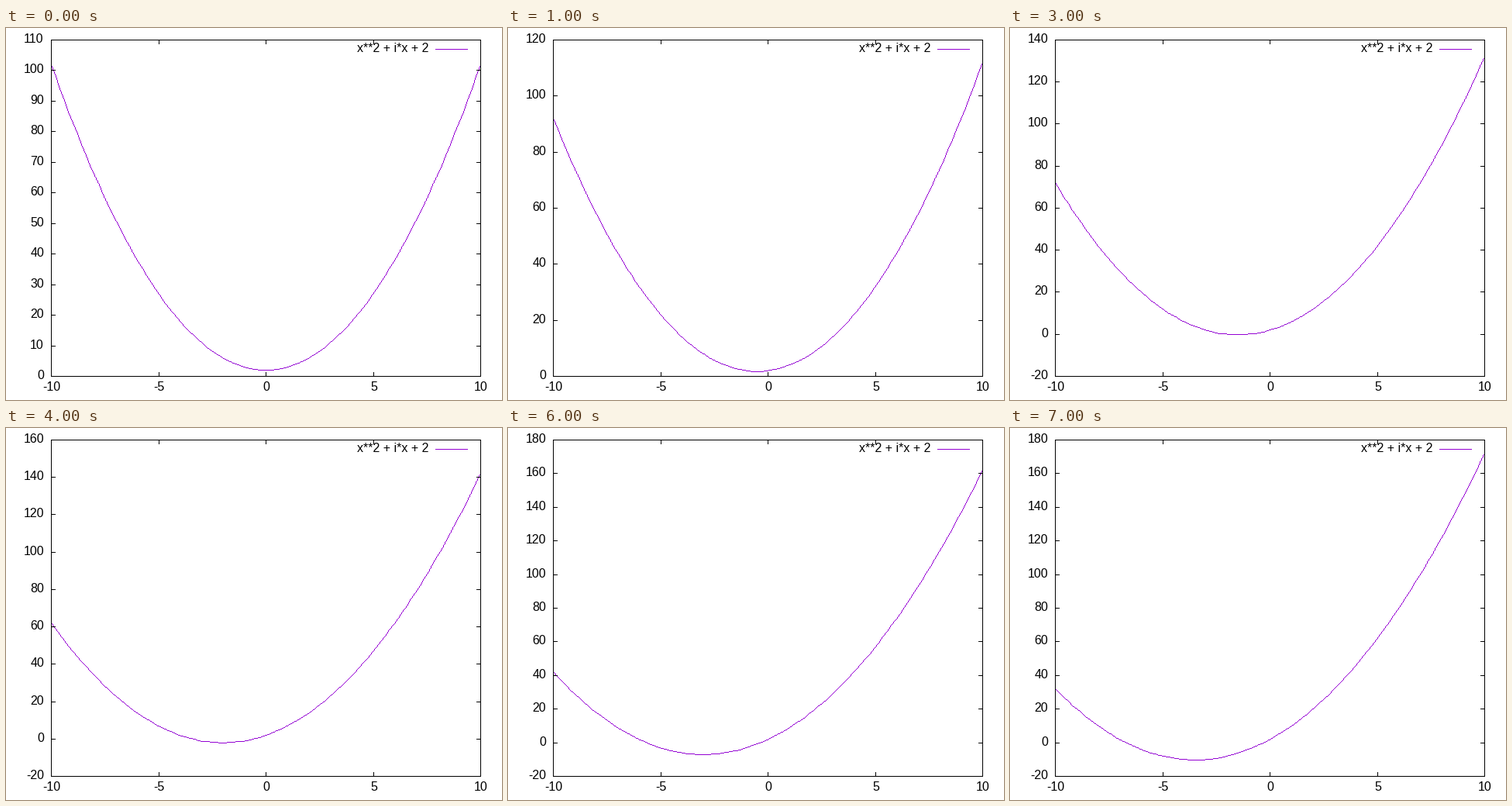
Write a matplotlib script that moves like this. It is 640 px wide and 480 px high and loops after 8000 ms.

```python
import numpy as np
import matplotlib.pyplot as plt
from matplotlib.animation import FuncAnimation

W, H, DPI = 640, 480, 100
LEFT, RIGHT, TOP, BOTTOM = 58, 612, 15, 449
TICK = 5
FONT_PX = 16
BLACK, PURPLE = (0, 0, 0), (148, 0, 211)

fig = plt.figure(figsize=(W / DPI, H / DPI), dpi=DPI, facecolor="white")
ax = fig.add_axes([0, 0, 1, 1])
ax.axis("off")
blank = np.full((H, W, 3), 255, np.uint8)
image = ax.imshow(blank, extent=(0, W, H, 0), aspect="auto",
                  interpolation="nearest")
ax.set_xlim(0, W)
ax.set_ylim(H, 0)


def advance(text):
    """Width in pixels of a number label."""
    return FONT_PX * sum(0.333 if c == "-" else 0.556 for c in text)


def label(x, baseline, text=""):
    return ax.text(x, baseline, text, family="Liberation Sans",
                   fontsize=FONT_PX * 72 / DPI, color="black",
                   ha="left", va="baseline")


def line(canvas, x0, y0, x1, y1, color):
    """One pixel wide line without antialiasing."""
    n = int(max(abs(x1 - x0), abs(y1 - y0))) + 1
    xs = np.rint(np.linspace(x0, x1, n)).astype(int)
    ys = np.rint(np.linspace(y0, y1, n)).astype(int)
    canvas[ys, xs] = color


def col(x):
    return np.floor(LEFT + (x + 10) * (RIGHT - LEFT) / 20 + 0.5).astype(int)


def row(y, lo, hi):
    up = np.floor((y - lo) * (BOTTOM - TOP) / (hi - lo) + 0.5)
    return BOTTOM - up.astype(int)


x_ticks = np.arange(-10, 11, 5)
for v in x_ticks:
    label(col(v) + 0.5 - advance(str(v)) / 2, 468, str(v))
label(453, 31, "x**2 + i*x + 2")
y_labels = [label(0, 0) for _ in range(12)]

samples = np.linspace(-10, 10, 100)


def draw(i):
    values = samples**2 + i * samples + 2
    step = 10 if i == 0 else 20
    lo = int(np.floor(values.min() / step)) * step
    hi = int(np.ceil(values.max() / step)) * step
    y_ticks = np.arange(lo, hi + 1, step)
    canvas = blank.copy()

    xs, ys = col(samples), row(values, lo, hi)
    for seg in zip(xs, ys, xs[1:], ys[1:]):
        line(canvas, *seg, PURPLE)
    line(canvas, 554, 27, 595, 27, PURPLE)

    for x in (LEFT, RIGHT):
        line(canvas, x, TOP, x, BOTTOM, BLACK)
    for y in (TOP, BOTTOM):
        line(canvas, LEFT, y, RIGHT, y, BLACK)
    for x in col(x_ticks):
        line(canvas, x, TOP, x, TOP + TICK, BLACK)
        line(canvas, x, BOTTOM - TICK, x, BOTTOM, BLACK)
    for y in row(y_ticks, lo, hi):
        line(canvas, LEFT, y, LEFT + TICK, y, BLACK)
        line(canvas, RIGHT - TICK, y, RIGHT, y, BLACK)
    image.set_data(canvas)

    for k, text in enumerate(y_labels):
        shown = k < len(y_ticks)
        text.set_visible(shown)
        if shown:
            name = str(y_ticks[k])
            text.set_text(name)
            text.set_position((49 - advance(name),
                               row(y_ticks[k], lo, hi) + 4))
    return [image, *y_labels]


anim = FuncAnimation(fig, draw, frames=8, interval=1000, repeat=True,
                     repeat_delay=0, blit=False)
plt.show()
```
